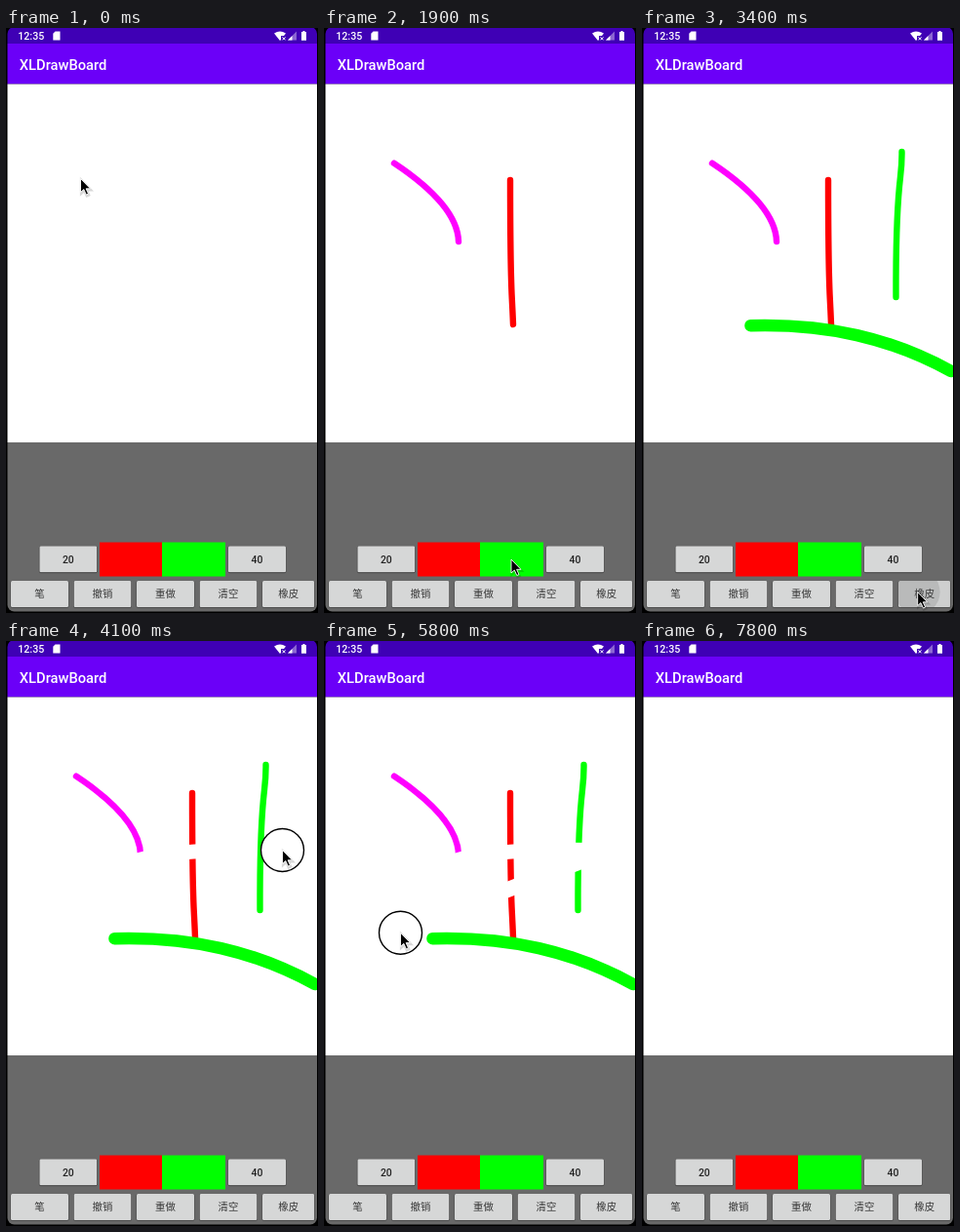
Recreate the animation shown at these times as an HTML page. Size 320 by 600 pixels, loop 7900 ms.

```html
<!DOCTYPE html>
<html lang="zh">
<head>
<meta charset="utf-8">
<title>XLDrawBoard</title>
<style>
  html, body { margin: 0; width: 100%; height: 100%; overflow: hidden; background: #000; }
  svg { display: block; }
  text { font-family: Roboto, "Noto Sans CJK SC", "Noto Sans CJK", sans-serif; }
  .label { font-size: 10.4px; font-weight: 500; fill: #222; text-anchor: middle; }
  .cjk { font-weight: 400; fill: #383838; }
  #ink path { fill: none; stroke-linecap: round; }
</style>
</head>
<body>
<svg width="320" height="600" viewBox="0 0 320 600">
  <clipPath id="screen"><rect x="1.5" y="-1" width="317.5" height="599.5" rx="7"/></clipPath>
  <clipPath id="board"><rect x="2" y="57" width="317" height="368"/></clipPath>
  <g clip-path="url(#screen)">
    <rect width="320" height="16" fill="#3f00b5"/>
    <rect y="16" width="320" height="41.5" fill="#6b00f8"/>
    <rect y="57.5" width="320" height="367.5" fill="#fff"/>
    <rect y="425" width="320" height="175" fill="#696969"/>
  </g>
  <g fill="#fff">
    <text x="12.3" y="12.2" font-size="10.6" font-weight="500">12:35</text>
    <text x="13.8" y="42.7" font-size="14.7" font-weight="500">XLDrawBoard</text>
    <path d="M50.5 3.5H55.5V12.5H48.3V5.7Z"/>
    <path d="M275 5.5Q281 1.5 287 5.5L285 8H282V12L281 13Z"/>
    <path d="M298 3.5V12.5H289Z" opacity=".4"/>
    <path d="M293.5 8V12.5H289Z"/>
    <path d="M304.5 3H306.5V4H308V12.7H303V4H304.5Z"/>
    <path d="M283.5 9.3L286.5 12.3M286.5 9.3L283.5 12.3" stroke="#fff"/>
  </g>
  <rect x="96" y="527.5" width="64" height="35" fill="#f00"/>
  <rect x="160" y="527.5" width="65" height="35" fill="#0f0"/>
  <g id="buttons"></g>
  <g id="ink" clip-path="url(#board)"></g>
  <circle id="ring" r="22" fill="#fff" stroke="#000" stroke-width="1.4"/>
  <g id="cursor">
    <path id="arrow" d="M0 0V14L3.3 11 5.8 16.5 8 15.5 5.6 10.3H10Z" stroke="#fff" stroke-width=".9"/>
  </g>
</svg>
<script>
const LOOP = 7900, STEP = 100, HOLD = 100, GLOW = 300, LAG = 100;
const $ = id => document.getElementById(id);
const clamp = p => Math.min(1, Math.max(0, p));
const show = (el, visible) => { el.style.display = visible ? '' : 'none'; };

function add(parent, tag, attrs) {
  const el = document.createElementNS('http://www.w3.org/2000/svg', tag);
  for (const k in attrs) el.setAttribute(k, attrs[k]);
  return parent.appendChild(el);
}

// Where the pointer's tip lands when it clicks each control
const spots = { red: { x: 128, y: 545 }, green: { x: 192, y: 545 } };
const taps = [];

function addButton(label, x, y, width = 59) {
  const height = 27, spot = spots[label] = { x: x + width / 2 - 7, y: y + height / 2 - 2 };
  add($('buttons'), 'rect', { x: x - .5, y, width: width + 1, height: height + 1, rx: 2, fill: '#4c4c4c' });
  const box = add($('buttons'), 'svg', { x, y, width, height });
  add(box, 'rect', { width, height, rx: 1.5, fill: '#d6d7d7' });
  spot.shade = add(box, 'rect', { width, height, opacity: .04 });
  spot.ripple = add(box, 'circle', { cx: spot.x - x, cy: spot.y - y, opacity: .1 });
  const kind = label > 0 ? 'label' : 'label cjk';
  add(box, 'text', { x: width / 2, y: 17.3, class: kind }).textContent = label;
}

addButton('20', 34.3, 531.3);
addButton('40', 228, 531.3);
['笔', '撤销', '重做', '清空', '橡皮'].forEach((label, i) => {
  const x = 5 + 64.5 * i;
  addButton(label, x, 567, Math.min(59, 316.3 - x));
});

// Actions: each has a start, an end and a position in between
const hover = (start, x, y) => ({ start, end: start, at: () => ({ x, y }) });

function tap(start, name) {
  const spot = spots[name];
  taps.push({ start, spot });
  return { start, end: start + HOLD, at: () => spot };
}

function drag(start, duration, color, width, d) {
  const path = add($('ink'), 'path', { d, stroke: color, 'stroke-width': width });
  const length = path.getTotalLength();
  return {
    start, end: start + duration, path, length, eraser: color === '#fff',
    at: p => path.getPointAtLength(length * p)
  };
}

const undo = tap(6800, '撤销'), redo = tap(7050, '重做'), clear = tap(7350, '清空');
const lastStroke = drag(6300, 250, '#f0f', 6.4, 'M78 297.5C78 360 78 375 80.5 383.5');

const actions = [
  hover(0, 76.5, 154.5),
  drag(200, 400, '#f0f', 6.4, 'M72 138.7Q137 182 138 219'),
  hover(1000, 155, 275.5),
  tap(1150, 'red'),
  drag(1400, 250, '#f00', 6.4, 'M191 156C191 270 192 255 194 304'),
  tap(1800, 'green'),
  drag(2050, 250, '#0f0', 6.4, 'M266.5 127C267 160 260 150 260.5 276'),
  tap(2450, '40'),
  hover(2700, 205.5, 297),
  drag(2850, 300, '#0f0', 12.6, 'M111.5 305.2C190 303 255 318 317 352'),
  tap(3350, '橡皮'),
  drag(3650, 450, '#fff', 15, 'M122 231Q150 212 283.5 214.5'),
  drag(4100, 1700, '#fff', 16, 'M283.5 214.5C310 212 240 232 78.5 299.3'),
  tap(6050, '笔'),
  lastStroke, undo, redo, clear,
  hover(7600, 228, 620),
  hover(LOOP, 228, 620)
];
const strokes = actions.filter(a => a.path);

const progress = (a, t) => clamp((t - a.start) / (a.end - a.start || 1));

function pointer(t) {
  const i = actions.findIndex(a => a.end >= t), next = actions[i];
  if (t >= next.start) return next.at(progress(next, t));
  const prev = actions[i - 1], from = prev.at(1), to = next.at(0);
  const p = (t - prev.end) / (next.start - prev.end);
  return { x: from.x + (to.x - from.x) * p, y: from.y + (to.y - from.y) * p };
}

function draw(t) {
  const undone = t >= undo.start && t < redo.start;
  for (const s of strokes) {
    const time = s.eraser ? t - LAG : t;
    show(s.path, time >= s.start && t < clear.start && !(undone && s === lastStroke));
    s.path.setAttribute('stroke-dasharray', `${s.length * progress(s, time) + .01} 999`);
  }
  for (const { start, spot } of taps) {
    if (!spot.shade) continue;
    const age = t - start, lit = age >= 0 && age < GLOW;
    show(spot.shade, lit);
    show(spot.ripple, lit);
    spot.ripple.setAttribute('r', 13 + Math.max(0, age) * .2);
  }
  const { x, y } = pointer(t);
  for (const id of ['cursor', 'ring']) $(id).setAttribute('transform', `translate(${x} ${y})`);
  show($('ring'), strokes.some(s => s.eraser && t >= s.start && t <= s.end));
}

for (const label in spots) {
  const { shade, ripple } = spots[label];
  if (shade) [shade, ripple].forEach(el => show(el, false));
}
const shadow = $('arrow').cloneNode();
for (const [k, v] of Object.entries({ id: 'shadow', transform: 'translate(.6 1.4)', stroke: '#000', 'stroke-width': 2.5, opacity: .15 }))
  shadow.setAttribute(k, v);
$('cursor').prepend(shadow);

const began = performance.now();
function tick() {
  const t = (performance.now() - began) % LOOP;
  draw(Math.floor(t / STEP) * STEP);
  requestAnimationFrame(tick);
}
tick();
</script>
</body>
</html>
```
